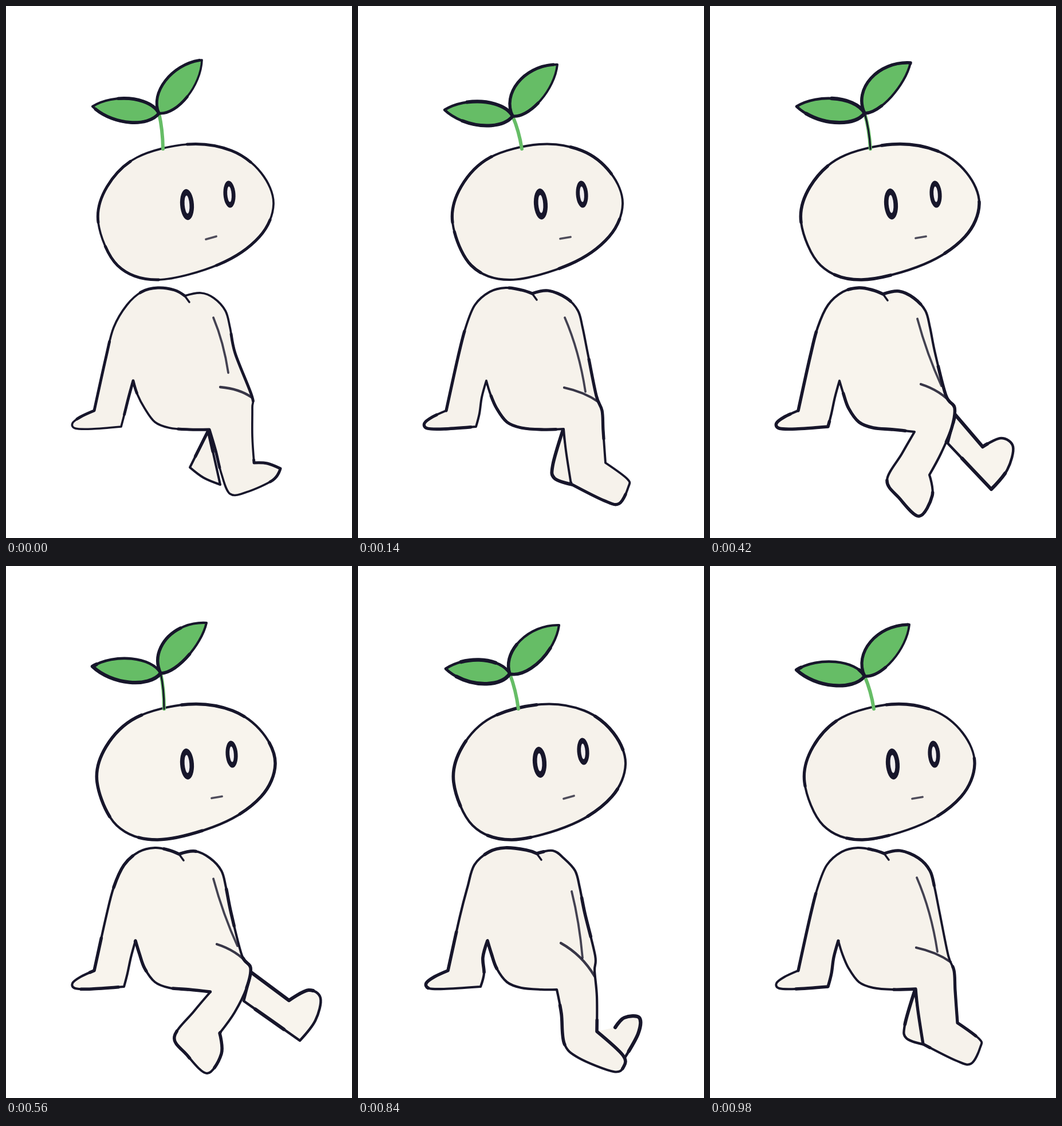
Animation of 604x927 px, one loop 1120 ms. Source, as an HTML page:

```html
<!DOCTYPE html>
<html lang="en">
<head>
<meta charset="utf-8">
<title>Sprout swinging its legs</title>
<style>
  html, body { margin: 0; width: 100%; height: 100%; overflow: hidden; background: #fff; }
  svg { display: block; width: 100vw; height: 100vh; }
  path { stroke-linecap: round; stroke-linejoin: round; }
  .pose {
    opacity: 0;
    animation: show 1120ms step-end infinite;
    animation-delay: calc(var(--i) * 140ms - 1120ms);
  }
  .soft { filter: blur(.6px); }
  @keyframes show {
    0% { opacity: 1; }
    12.5%, 100% { opacity: 0; }
  }
</style>
</head>
<body>
<svg id="stage" viewBox="0 0 604 927"></svg>
<script>
const INK = '#17162b', GREEN = '#66bd66';

let seed = 7;
const random = (lo, hi) => {
  seed = seed * 16807 % 2147483647;
  return lo + (hi - lo) * seed / 2147483647;
};

// Smooth path through "x,y" points; "!" marks a corner, a final "z" closes it.
function trace(text) {
  const closed = text.endsWith('z');
  const pts = text.replace('z', '').trim().split(/\s+/).map(t => {
    const [x, y] = t.split(',').map(v => parseFloat(v));
    return { x, y, corner: t.endsWith('!') };
  });
  const n = pts.length;
  const at = i => closed ? pts[(i + n) % n] : pts[Math.max(0, Math.min(n - 1, i))];
  const handle = (i, side) => {
    const p = at(i), a = at(i - 1), b = at(i + 1), k = p.corner ? 0 : side / 6;
    return `${p.x + (b.x - a.x) * k},${p.y + (b.y - a.y) * k}`;
  };
  let d = `M${pts[0].x},${pts[0].y}`;
  for (let i = 0; i < (closed ? n : n - 1); i++) {
    const q = at(i + 1);
    d += `C${handle(i, 1)} ${handle(i + 1, -1)} ${q.x},${q.y}`;
  }
  return d + (closed ? 'Z' : '');
}

const stroke = (d, w, color = INK, more = '') =>
  `<path d="${d}" fill="none" stroke="${color}" stroke-width="${w}" ${more}/>`;

// Uneven pen: a thin line with randomly placed heavier stretches.
function pen(d, w) {
  const dashes = Array.from({ length: 4 }, () => random(50, 150).toFixed());
  return stroke(d, w * .85) + stroke(d, w * 1.15, INK, `stroke-dasharray="${dashes}"`);
}

const shape = (d, fill, w) => `<path d="${d}" fill="${fill}"/>` + pen(d, w);
const arc = (x1, y1, x2, y2, bend) =>
  `M${x1},${y1}Q${(x1 + x2) / 2 + bend},${(y1 + y2) / 2 - bend} ${x2},${y2}`;

// Leaf between two points, bulging by a on one side and b on the other.
function leaf([x, y], [tx, ty], a, b, w) {
  const dx = tx - x, dy = ty - y, len = Math.hypot(dx, dy);
  const ctrl = (k, off) => `${x + dx * k + dy / len * off},${y + dy * k - dx / len * off}`;
  const d = `M${x},${y}C${ctrl(.15, a)} ${ctrl(.7, a)} ${tx},${ty}` +
    `C${ctrl(.7, -b)} ${ctrl(.15, -b)} ${x},${y}Z`;
  return shape(d, GREEN, w);
}

function eye([x, y], rx, ry) {
  const oval = (k, m, fill) => `<ellipse cx="${x}" cy="${y}" rx="${rx * k}" ry="${ry * m}" fill="${fill}"/>`;
  return `<g transform="rotate(-4 ${x} ${y})">${oval(1, 1, INK)}${oval(.36, .58, '#f2eff0')}</g>`;
}

// One head outline, fitted between the left and right edge of each pose.
function head([left, right]) {
  const x = k => left + (right - left) * k;
  return trace(`${x(0)},377 ${x(.05)},315 ${x(.22)},264 ${x(.51)},241 ${x(.76)},252 ${x(.93)},291 ` +
    `${x(1)},345 ${x(.92)},402 ${x(.69)},450 ${x(.34)},477 ${x(.11)},452 z`);
}

// Arm, shoulders, leg, seat and hand, all placed from a few joints.
function body({ wrist, shoulder: s, notch: [nx, ny], back: r, hip, leg, seat: [sx, sy], crotch: c, palm }) {
  return trace(
    `${wrist},705! ${wrist + 21},610 ${wrist + 34},560 ${s},521 ${s + 26},498 ${s + 54},491 ` +
    `${nx - 18},495 ${nx},${ny}! ${nx + 28},${ny - 5} ${r - 20},509 ${r},531 ${r + 8},560 ${r + 17},605 ` +
    `${hip},679 ${leg} ${sx},${sy}! 320,738 285,735 260,725 242,701 ${c + 7},676 ${c},653! ` +
    `${c - 8},682 ${palm + 6},710 ${palm},733! 150,737 ${wrist - 33},736 ${wrist - 38},727 ${wrist - 24},716 z`);
}

const back = {
  soft: true, skin: '#f6f2eb', pen: 4.3,
  head: [161, 467], eyes: [[316, 346], [390, 328]], mouth: [358, 404, -5],
  wrist: 154, shoulder: 211, notch: [312, 505], back: 383, hip: 429, seat: [355, 738], crotch: 222, palm: 201,
  leg: '430,700 430,750 433,796! 456,797 479,806! 466,826 420,847 391,850 376,815 366,775',
  rear: '353,740! 321,804! 345,822 374,834! z',
  arm: [362, 543, 388, 639, 5], thigh: [374, 664, 429, 682, 6],
  base: [267, 187], left: [151, 175], right: [342, 94], bulge: [36, 27]
};
const low = {
  soft: true, skin: '#f6f2eb', pen: 4.6,
  head: [165, 462], eyes: [[319, 345], [391, 328]], mouth: [362, 404, -3],
  wrist: 154, shoulder: 204, notch: [304, 501], back: 384, hip: 416, seat: [359, 737], crotch: 224, palm: 206,
  leg: '426,705 428,740 432,796! 470,824 472,838 456,867 430,862 372,833! 363,775',
  rear: '358,738! 340,800 343,823 374,834! z',
  arm: [361, 543, 397, 672, 7], thigh: [360, 665, 420, 690, 5],
  base: [270, 192], left: [151, 181], right: [348, 102], bulge: [42, 25]
};
const mid = {
  soft: true, skin: '#f6f2eb', pen: 4.9,
  head: [167, 467], eyes: [[317, 342], [393, 323]], mouth: [368, 403, -5],
  wrist: 157, shoulder: 203, notch: [312, 501], back: 379, hip: 414, seat: [347, 738], crotch: 226, palm: 214,
  leg: '413,705 417,750 417,811! 462,852 464,872 446,881 385,857 360,832 355,780',
  rear: '449,804! 465,787 491,787 489,815 465,858! 417,811!',
  arm: [373, 567, 392, 683, 4], thigh: [354, 657, 413, 715, 8],
  base: [265, 188], left: [153, 179], right: [351, 103], bulge: [38, 28]
};
const out = {
  soft: false, skin: '#f8f4ed', pen: 4.8, darkStem: true,
  head: [159, 470], eyes: [[316, 345], [394, 328]], mouth: [368, 403, -3],
  wrist: 154, shoulder: 206, notch: [302, 502], back: 376, hip: 412, seat: [357, 742], crotch: 226, palm: 206,
  leg: '427,700 422,735 403,780 383,817! 388,853 365,889 330,857 309,826 335,780',
  rear: '428,712! 476,768! 508,753 529,768 519,808 491,842! 415,762! z',
  arm: [362, 545, 404, 662, -4], thigh: [368, 659, 424, 695, 7],
  base: [270, 187], left: [151, 175], right: [350, 99], bulge: [44, 20]
};
const far = {
  ...out,
  leg: '427,700 420,735 399,778 373,814! 376,850 351,884 315,851 294,820 328,776',
  rear: '428,708! 494,757! 528,739 549,753 540,792 513,827! 415,758! z'
};

function draw(p, foot) {
  const [mx, my, tilt] = p.mouth, [bx, by] = p.base, [nx, ny] = p.notch;
  const stem = arc(bx, by, foot, 249, 3);
  return [
    shape(trace(p.rear), p.skin, p.pen * 1.1),
    shape(body(p), p.skin, p.pen),
    stroke(`M${nx},${ny}l8,11`, 3.5),
    stroke(arc(...p.arm), 3.8, INK, 'opacity=".8"'),
    stroke(arc(...p.thigh), 4.3, INK, 'opacity=".85"'),
    shape(head(p.head), p.skin, p.pen),
    eye(p.eyes[0], 12, 27),
    eye(p.eyes[1], 10.5, 23.5),
    stroke(`M${mx - 9},${my - tilt / 2}l18,${tilt}`, 3.8, INK, 'opacity=".75"'),
    stroke(stem, 6, GREEN),
    p.darkStem ? stroke(stem, 3) : '',
    leaf(p.base, p.right, ...p.bulge, p.pen),
    leaf(p.base, p.left, 28, 27, p.pen * 1.15)
  ].join('');
}

// The legs swing out and back; the stem's foot wanders on its own.
const swing = [back, low, mid, out, far];
const stemFeet = [274, 286, 275, 280, 276, 276, 280, 286];

document.getElementById('stage').innerHTML = stemFeet.map((foot, i) => {
  const pose = swing[Math.min(i, 8 - i)];
  return `<g class="pose" style="--i:${i}"><g class="${pose.soft ? 'soft' : ''}">${draw(pose, foot)}</g></g>`;
}).join('');
</script>
</body>
</html>
```
